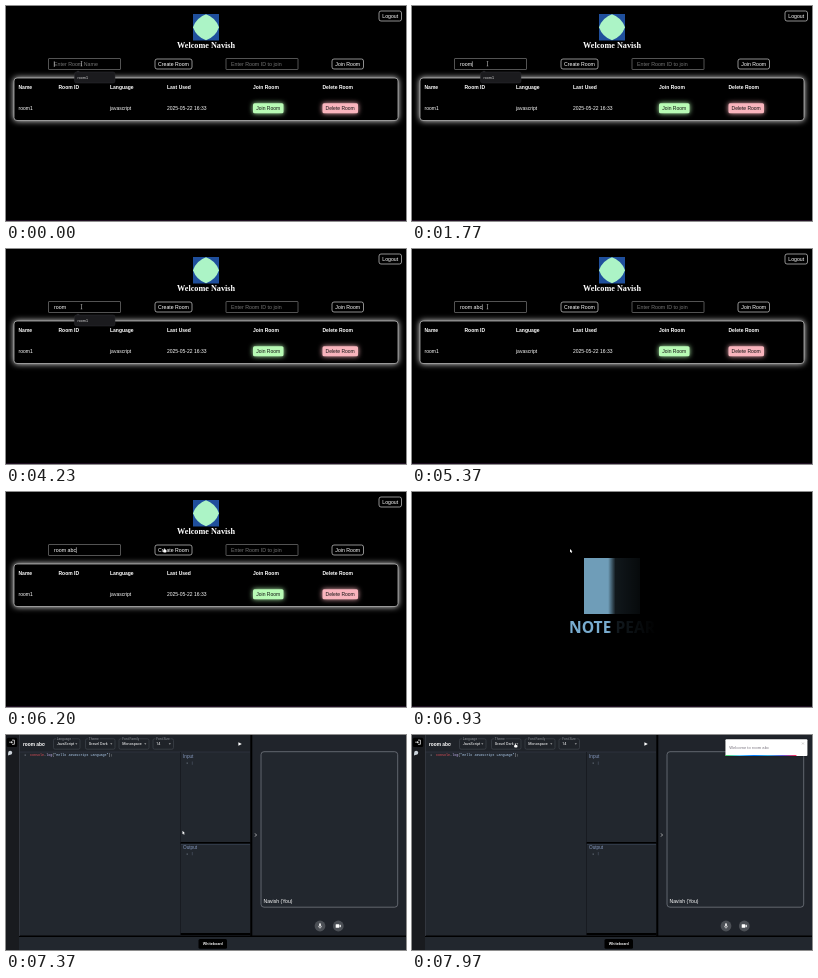
An HTML page with a canvas that plays this animation: 400x215 px, repeating every 8000 ms.

```html
<!DOCTYPE html>
<html lang="en">
<head>
<meta charset="utf-8">
<title>Room lobby and editor</title>
<style>
  html, body { margin: 0; width: 100%; height: 100%; overflow: hidden; background: #000; }
  canvas { display: block; width: 400px; height: 215px; }
</style>
</head>
<body>
<canvas id="stage"></canvas>
<script>
const LOOP = 8000;
const PAGE_END = 6230, LOADER_START = 6500, EDITOR_START = 7100, BAR_DARK = 7300, TOAST_START = 7300;
const SANS = '"Liberation Sans", Arial, sans-serif';
const SERIF = '"Liberation Serif", serif';
const UI = 'Roboto, sans-serif';
const MONO = '"Liberation Mono", monospace';
const PANEL = '#22272e';
const USER = 'Navish';

const canvas = document.getElementById('stage');
const ctx = canvas.getContext('2d');
const ratio = window.devicePixelRatio || 1;
canvas.width = 400 * ratio;
canvas.height = 215 * ratio;
ctx.scale(ratio, ratio);

function text(str, x, y, size, color = '#fff', font = SANS, weight = 400, align = 'left') {
  ctx.font = `${weight} ${size}px ${font}`;
  ctx.textAlign = align;
  ctx.fillStyle = color;
  ctx.fillText(str, x, y);
}

function fill(x, y, w, h, color) {
  ctx.fillStyle = color;
  ctx.fillRect(x, y, w, h);
}

function box(x, y, w, h, { r = 2, bg, line, width = 0.7, glow, blur = 0 }) {
  ctx.save();
  ctx.beginPath();
  ctx.roundRect(x, y, w, h, r);
  if (glow) {
    ctx.shadowColor = glow;
    ctx.shadowBlur = blur * ratio;
  }
  if (bg) {
    ctx.fillStyle = bg;
    ctx.fill();
  }
  ctx.shadowBlur = 0;
  if (line) {
    ctx.strokeStyle = line;
    ctx.lineWidth = width;
    ctx.stroke();
  }
  ctx.restore();
}

function shape(points, color) {
  ctx.beginPath();
  points.forEach(([x, y]) => ctx.lineTo(x, y));
  ctx.closePath();
  ctx.fillStyle = color;
  ctx.fill();
}

function stroke(points, color, width = 0.6) {
  ctx.beginPath();
  points.forEach(([x, y]) => ctx.lineTo(x, y));
  ctx.strokeStyle = color;
  ctx.lineWidth = width;
  ctx.stroke();
}

function disc(x, y, r, color) {
  ctx.beginPath();
  ctx.arc(x, y, r, 0, 7);
  ctx.fillStyle = color;
  ctx.fill();
}

// Pointer path: [time, x, y]
const POINTER = [
  [0, 75.5, 57.5], [5450, 75.5, 57.5], [6000, 158, 57], [6930, 158, 57],
  [7170, 180, 100], [7300, 180, 100], [7850, 103, 9], [8000, 103, 9]
];

function pointerAt(t) {
  const i = Math.max(1, POINTER.findIndex(p => t < p[0]));
  const [t0, x0, y0] = POINTER[i - 1], [t1, x1, y1] = POINTER[i];
  const p = (t - t0) / (t1 - t0);
  const k = p * p * (3 - 2 * p);
  return [x0 + (x1 - x0) * k, y0 + (y1 - y0) * k];
}

function drawPointer(t) {
  const [x, y] = pointerAt(t);
  const overField = t < PAGE_END && x < 114;
  const overButton = t < PAGE_END ? x > 149 : t > EDITOR_START && y < 14;
  if (overField) {
    stroke([[x, y - 2], [x, y + 2.5]], '#ddd', 0.5);
    stroke([[x - 0.8, y - 2], [x + 0.8, y - 2]], '#ddd', 0.4);
    stroke([[x - 0.8, y + 2.5], [x + 0.8, y + 2.5]], '#ddd', 0.4);
  } else if (overButton) {
    box(x - 0.1, y - 0.7, 0.9, 3.4, { r: 0.4, bg: '#fff' });
    box(x - 0.9, y + 1, 3.4, 2.6, { r: 1, bg: '#fff' });
  } else {
    shape([[x, y], [x, y + 3.4], [x + 0.8, y + 2.7], [x + 1.4, y + 3.9],
      [x + 2, y + 3.6], [x + 1.5, y + 2.4], [x + 2.5, y + 2.4]], '#fff');
  }
}

// Time at which each character of the room name is typed
const KEYS = [500, 800, 1050, 1400, 2600, 4500, 4800, 5100];

function drawAvatar() {
  fill(187, 8, 26, 26.5, '#1f4f9c');
  const c = 13;
  ctx.save();
  ctx.translate(200, 21.2);
  ctx.beginPath();
  ctx.moveTo(0, -c);
  for (const [cx, cy, x, y] of [[1, -1, 1, 0], [1, 1, 0, 1], [-1, 1, -1, 0], [-1, -1, 0, -1]]) {
    ctx.quadraticCurveTo(cx * c * 0.74, cy * c * 0.74, x * c, y * c);
  }
  ctx.fillStyle = '#acf4c6';
  ctx.fill();
  ctx.restore();
}

function drawLobby(t) {
  drawAvatar();
  text('Welcome ' + USER, 200, 42, 8.2, '#fff', SERIF, 700, 'center');

  const button = (label, x, y, w) => {
    box(x, y, w, 10, { line: '#ccc' });
    text(label, x + w / 2, y + 6.9, 5.2, '#fff', SANS, 400, 'center');
  };
  button('Logout', 373, 5, 22.5);
  button('Create Room', 149, 53, 37);
  button('Join Room', 326, 53, 31.5);

  box(42.5, 52.5, 72, 11, { r: 0.5, line: '#777' });
  box(220, 52.5, 72, 11, { r: 0.5, line: '#777' });
  text('Enter Room ID to join', 225, 60, 5.3, '#757575');

  const typed = 'room abc'.slice(0, KEYS.filter(k => k <= t).length);
  text(typed || 'Enter Room Name', 48, 60, 5.3, typed ? '#fff' : '#757575');
  const lastKey = KEYS[typed.length - 1] || 0;
  if ((t - lastKey) % 1000 < 500) {
    const caretX = 48.3 + (typed ? ctx.measureText(typed).width : 0);
    stroke([[caretX, 55.3], [caretX, 61]], '#fff', 0.5);
  }

  box(8, 72, 384, 42.5, { r: 3, bg: '#000', line: '#b0b0b0', width: 0.8, glow: '#fff', blur: 6 });
  const columns = [
    ['Name', 12.5, 'room1'], ['Room ID', 52.5, ''], ['Language', 104, 'javascript'],
    ['Last Used', 161, '2025-05-22 16:33'], ['Join Room', 247, ''], ['Delete Room', 316.5, '']
  ];
  for (const [title, x, value] of columns) {
    text(title, x, 83.2, 5, '#fff', SANS, 700);
    text(value, x, 104, 5);
  }
  box(247, 97.3, 30.5, 10, { r: 1.5, bg: '#b8fbb5', glow: '#b8fbb5', blur: 5 });
  text('Join Room', 262.2, 104, 5, '#111', SANS, 400, 'center');
  box(316.5, 97.3, 35.5, 10, { r: 1.5, bg: '#f9b4bd', glow: '#f9b4bd', blur: 5 });
  text('Delete Room', 334.2, 104, 5, '#111', SANS, 400, 'center');

  // Autocomplete suggestion
  if (t < KEYS[5]) {
    shape([[69.5, 66.5], [72, 64.5], [74.5, 66.5]], '#27272b');
    box(68.5, 66, 40.5, 11, { r: 2, bg: '#1b1b1e', line: '#2c2c31', width: 0.5 });
    text('room1', 71.5, 72.8, 3.7, '#ddd');
  }
}

function drawLoader(t) {
  fill(172, 66, 56, 56, '#6f9db8');
  text('NOTE PEAR', 200, 141, 15.6, '#79add0', '"Noto Sans", sans-serif', 700, 'center');
  const edge = 157 + (t - LOADER_START) * 0.1;
  const shade = ctx.createLinearGradient(edge - 4, 0, edge + 45, 0);
  shade.addColorStop(0, 'rgba(0,0,0,0)');
  shade.addColorStop(0.15, 'rgba(0,0,0,.85)');
  shade.addColorStop(1, '#000');
  fill(150, 60, 100, 90, shade);
}

function drawSelect(label, value, x, w) {
  box(x, 3.8, w, 10.4, { r: 1.6, line: '#454a52', width: 0.6 });
  ctx.font = `3.3px ${UI}`;
  fill(x + 2.5, 3, ctx.measureText(label).width + 1.5, 1.6, '#1f2329');
  text(label, x + 3.2, 4.6, 3.3, '#8b8f96', UI);
  text(value, x + 3.2, 10.4, 3.75, '#fff', UI);
  shape([[x + w - 4.8, 8.4], [x + w - 2.6, 8.4], [x + w - 3.7, 9.6]], '#ddd');
}

function drawEditor(t) {
  fill(0, 0, 400, 215, PANEL);
  fill(0, 0, 13, 215, '#191b1f');
  fill(13, 0, 231, 17, '#1f2329');
  fill(246, 0, 154, 202, '#20242b');
  fill(13, 16.7, 231, 0.6, '#343b46');
  fill(174, 17, 0.7, 183, '#15181c');
  fill(174.7, 107, 69.8, 2, '#000');
  fill(174.7, 198, 69.8, 2, '#000');
  fill(175, 108.8, 69, 0.6, '#46556c');
  fill(244.3, 0, 2, 202, '#000');
  fill(13, 200.5, 387, 1.5, '#000');
  fill(13, 0, 0.7, 201, '#3a3e45');

  // Sidebar icons
  box(0.8, 2.8, 10.4, 9.2, { r: 1.5, bg: '#000' });
  stroke([[6, 5.1], [8.4, 5.1], [8.4, 9.3], [6, 9.3]], '#fff', 0.7);
  stroke([[3.2, 7.2], [6.2, 7.2]], '#fff', 0.7);
  shape([[5.3, 5.9], [6.9, 7.2], [5.3, 8.5]], '#fff');
  disc(4.2, 17.8, 2, '#ccd3da');
  shape([[2.2, 17.8], [2, 20.6], [4.5, 19.6]], '#ccd3da');

  text('room abc', 17, 10.7, 4.8, '#fff', SANS, 700);
  shape([[37.6, 8.7], [39.2, 8.7], [38.4, 9.7]], '#fff');
  drawSelect('Language', 'JavaScript', 47.5, 26.5);
  drawSelect('Theme', 'Gravel Dark', 79.5, 29.5);
  drawSelect('Font Family', 'Monospace', 113, 30);
  drawSelect('Font Size', '14', 147, 20.5);
  shape([[232.4, 7.2], [235.8, 9], [232.4, 10.8]], '#fff');

  text('1', 18, 21.3, 3.37, '#8b929b', MONO);
  let x = 24;
  for (const [part, color] of [['console', '#f0525c'], ['.', '#e1e4e8'], ['log', '#c8b4f4'],
    ['(', '#e1e4e8'], ['"Hello JavaScript Language"', '#b4d3f5'], [');', '#e1e4e8']]) {
    text(part, x, 21.3, 3.37, color, MONO);
    x += ctx.measureText(part).width;
  }
  for (const [title, y] of [['Input', 23.3], ['Output', 113.8]]) {
    text(title, 177, y, 4.7, '#8598bd', SANS);
    text('1', 180, y + 6, 3.37, '#7d8793', MONO);
    stroke([[186.3, y + 3.2], [186.3, y + 6.5]], '#65728a', 0.4);
  }
  stroke([[249, 98.4], [250.5, 100], [249, 101.6]], '#ddd', 0.7);

  // Video tile and call controls
  box(255, 16.7, 136.7, 155.5, { r: 3, bg: PANEL, line: '#7d828a', width: 0.7 });
  text(USER + ' (You)', 257.5, 168.2, 5.1);
  disc(314, 191, 5.4, '#4b4f55');
  disc(332.3, 191, 5.4, '#4b4f55');
  box(313.2, 188.2, 1.6, 3.4, { r: 0.8, bg: '#fff' });
  stroke([[312.3, 190.8], [312.8, 192.2], [315.2, 192.2], [315.7, 190.8]], '#fff', 0.5);
  stroke([[314, 192.2], [314, 193.6]], '#fff', 0.5);
  box(329.7, 189.3, 3.6, 3.4, { r: 0.5, bg: '#fff' });
  shape([[333.3, 190.7], [334.8, 189.5], [334.8, 192.5], [333.3, 191.3]], '#fff');

  fill(13, 202, 387, 13, t < BAR_DARK ? '#aaa' : PANEL);
  box(192.5, 204, 28.5, 9.8, { r: 1.5, bg: '#000' });
  text('Whiteboard', 206.8, 210.2, 3.9, '#fff', UI, 500, 'center');

  if (t >= TOAST_START) drawToast(t - TOAST_START);
}

const BOUNCE = [[0, 600], [0.6, -5], [0.75, 2], [0.9, -1], [1, 0]];

function drawToast(age) {
  const p = Math.min(age / 700, 0.9999);
  const i = BOUNCE.findIndex(b => p < b[0]);
  const [p0, x0] = BOUNCE[i - 1], [p1, x1] = BOUNCE[i];
  const eased = 1 - (1 - (p - p0) / (p1 - p0)) ** 3;
  ctx.save();
  ctx.translate(x0 + (x1 - x0) * eased, 0);
  box(313.5, 4.3, 82, 16.7, { r: 1, bg: '#fff', glow: 'rgba(0,0,0,.4)', blur: 3 });
  text('Welcome to room abc', 317.3, 14.2, 4.1, '#77727d', SANS);
  stroke([[390, 7.5], [392, 9.5]], '#999', 0.4);
  stroke([[392, 7.5], [390, 9.5]], '#999', 0.4);
  const width = 82 * (1 - age / 5000);
  const rainbow = ctx.createLinearGradient(313.5, 0, 313.5 + width, 0);
  ['#4cd964', '#5ac8fa', '#007aff', '#34aadc', '#5856d6', '#ff2d55']
    .forEach((color, n) => rainbow.addColorStop(n / 5, color));
  fill(313.5, 20, width, 1, rainbow);
  ctx.restore();
}

function draw(now) {
  const t = now % LOOP;
  fill(0, 0, 400, 215, '#000');
  if (t < EDITOR_START) fill(0, 214, 400, 1, '#1f0f22');
  if (t < PAGE_END) drawLobby(t);
  else if (t >= EDITOR_START) drawEditor(t);
  else if (t >= LOADER_START) drawLoader(t);
  drawPointer(t);
}

const start = performance.now();
function tick() {
  draw(performance.now() - start);
  requestAnimationFrame(tick);
}
tick();
</script>
</body>
</html>
```
